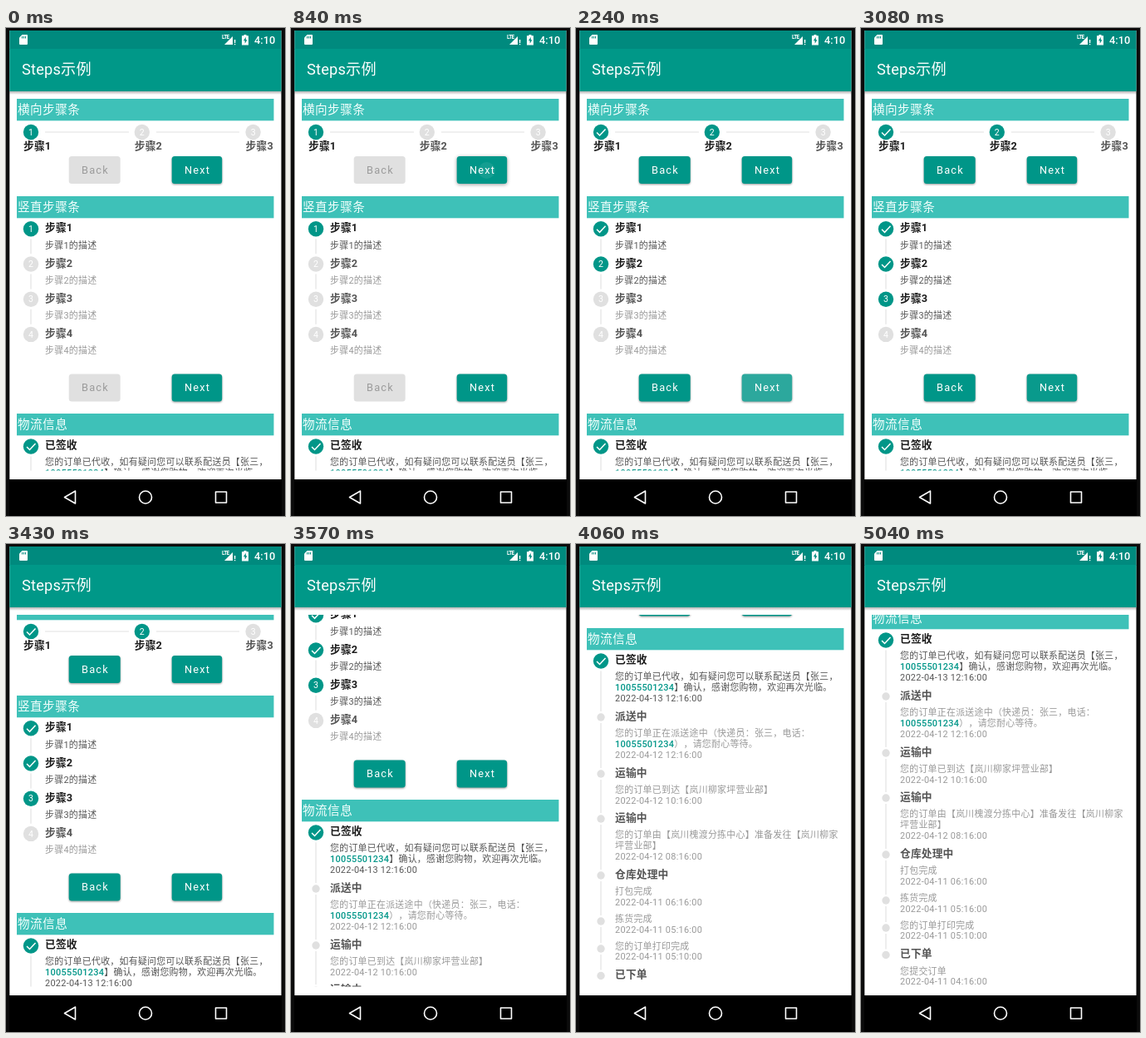
Animation of 336 by 586 pixels, one loop 5180 ms. Source, as an HTML page:

```html
<!DOCTYPE html>
<html lang="zh-CN">
<head>
<meta charset="utf-8">
<style>
html, body { margin: 0; width: 100%; height: 100%; overflow: hidden; background: #0b0b0b; }
svg { display: block; }
text { font-family: Roboto, 'Noto Sans CJK SC', 'Noto Sans CJK', sans-serif; white-space: pre; text-spacing-trim: space-all; }
.bar { font-size: 14.6px; letter-spacing: .46px; fill: #f4fffd; }
.title { font-size: 12.75px; font-weight: 700; letter-spacing: .15px; }
.desc { font-size: 10.93px; letter-spacing: .27px; }
.num { font-size: 10.5px; fill: #fff; text-anchor: middle; }
.btn { font-size: 12.75px; letter-spacing: 1.2px; }
</style>
</head>
<body>
<svg id="stage" width="336" height="586" viewBox="0 0 336 586">
  <defs>
    <clipPath id="view"><rect x="4" y="85" width="328" height="446.5"/></clipPath>
    <linearGradient id="shade" x2="0" y2="1"><stop stop-color="#000" stop-opacity=".3"/><stop offset="1" stop-opacity="0"/></linearGradient>
  </defs>
  <rect x="4.3" y="3" width="327.2" height="539" fill="#fff"/>
  <g clip-path="url(#view)"><g id="list"></g></g>
  <rect x="4.3" y="76" width="327.2" height="4" fill="url(#shade)"/>
  <rect x="4.3" y="3" width="327.2" height="23" fill="#008a7e"/>
  <rect x="4.3" y="25" width="327.2" height="51" fill="#009888"/>
  <text x="19" y="56" font-size="18.2" letter-spacing=".2" fill="#fff">Steps示例</text>
  <g fill="#fff">
    <path d="M19.500 8H25q1 0 1 1v10q0 1-1 1H17q-1 0-1-1V11.500z"/>
    <path d="M19.500 10v2.500M21.500 10v2.500M23.500 10v2.500" stroke="#008a7e"/>
    <text x="260" y="13" font-size="6.500" font-weight="700" letter-spacing="-.7">LTE</text>
    <path d="M263 20H273V10z"/>
    <path d="M275 14h1.300v4H275zM275 19h1.300v1.300H275z"/>
    <path d="M286.500 8h3v1.200H292V20.500H284V9.200h2.500z"/>
    <path d="M288.800 10.800l-2.800 4.500h1.700v3.400l2.700-4.500h-1.600z" fill="#008a7e"/>
    <text x="299" y="19" font-size="12.800" font-weight="500">4:10</text>
  </g>
  <rect x="4" y="542" width="328" height="44" fill="#000"/>
  <g fill="none" stroke="#fff" stroke-width="1.600" stroke-linejoin="round">
    <path d="M70.500 563.500L83.500 556V571z"/>
    <circle cx="168" cy="563.500" r="7.500"/>
    <rect x="252.500" y="557" width="13" height="13"/>
  </g>
</svg>
<script>
const LOOP = 5180, STEP = 70;
const TEAL = '#009688', GREY = '#e0e0e0', DARK = '#1c1c1c', MID = '#555', PALE = '#999';
const list = document.getElementById('list');
const PHONE = '10055501234', DEPOT = '岚川柳家坪营业部';

// dot centre, title, first line's centre, lines
const parcels = [
  [502.5, '已签收', 521, ['您的订单已代收，如有疑问您可以联系配送员【张三，', PHONE + '】确认，感谢您购物，欢迎再次光临。', '2022-04-13 12:16:00']],
  [570, '派送中', 589, ['您的订单正在派送途中（快递员：张三，电话：', PHONE + '），请您耐心等待。', '2022-04-12 12:16:00']],
  [638, '运输中', 657, ['您的订单已到达【' + DEPOT + '】', '2022-04-12 10:16:00']],
  [692, '运输中', 711, ['您的订单由【岚川槐渡分拣中心】准备发往【' + DEPOT.slice(0, 4), DEPOT.slice(4) + '】', '2022-04-12 08:16:00']],
  [760, '仓库处理中', 779, ['打包完成', '2022-04-11 06:16:00']],
  [815, '', 812, ['拣货完成', '2022-04-11 05:16:00']],
  [848, '', 844.5, ['您的订单打印完成', '2022-04-11 05:10:00']],
  [880.5, '已下单', 899.5, ['您提交订单', '2022-04-11 04:16:00']]
];

// time and scroll offset pairs
const scrollKeys = [[3360, 0], [3430, 20], [3570, 156], [3710, 283], [3850, 351], [3920, 357],
  [3990, 359], [4060, 362], [4130, 371], [4200, 381], [4270, 387]];

function scrollAt(t) {
  let [t0, y0] = scrollKeys[0];
  for (const [t1, y1] of scrollKeys) {
    if (t < t1) return t <= t0 ? y0 : Math.round(y0 + (y1 - y0) * (t - t0) / (t1 - t0));
    [t0, y0] = [t1, y1];
  }
  return y0;
}

const text = (cls, x, y, s, fill) => `<text class="${cls}" x="${x}" y="${y}"${fill ? ` fill="${fill}"` : ''}>${s}</text>`;
const disc = (x, y, r, fill) => `<circle cx="${x}" cy="${y}" r="${r}" fill="${fill}"/>`;
const line = (x0, y0, x1, y1) => `<path d="M${x0} ${y0}L${x1} ${y1}" stroke="#e2e2e2" stroke-width="1.2"/>`;
const bar = (y, s) => `<rect x="13" y="${y}" width="309.5" height="26.3" fill="#3ec1b8"/>` + text('bar', 14, y + 18, s);
const check = (x, y) => disc(x, y, 9.2, TEAL) +
  `<path d="M${x - 5} ${y + .5}l3.5 3.5l7-7.500" fill="none" stroke="#fff" stroke-width="1.5"/>`;

function badge(x, y, n, now) {
  return n < now ? check(x, y) : disc(x, y, 9.2, n === now ? TEAL : GREY) + text('num', x, y + 3.7, n);
}

function button(x, y, label, on, age = -1) {
  const w = label === 'Back' ? 62 : 60.5, h = 33;
  const held = age >= 0 && age < 210;
  const shadow = on ? `style="filter:drop-shadow(0 1px ${held ? 2 : 1}px rgba(0,0,0,.4))"` : '';
  let s = `<rect x="${x}" y="${y}" width="${w}" height="${h}" rx="3.5" fill="${on ? TEAL : GREY}" ${shadow}/>`;
  if (age >= 0 && age < 700) {
    const r = 10 + 42 * Math.min(1, age / 225);
    const alpha = .24 * Math.min(1, (age + 35) / 105, (700 - age) / 490);
    s += `<svg x="${x}" y="${y}" width="${w}" height="${h}"><circle cx="36" cy="17" r="${r}" fill="#fff" opacity="${alpha}"/></svg>`;
  }
  return s + text('btn', x + 15.3, y + 21, label, on ? '#fff' : '#9b9b9b');
}

function buttons(y, now, age) {
  return button(75.7, y, 'Back', now > 1) + button(199.7, y, 'Next', true, age);
}

function row(now, age) {
  let s = bar(85, '横向步骤条') + line(47, 125, 148, 125) + line(181, 125, 281, 125);
  for (let n = 1; n < 4; n++) {
    const x = 30 + (n - 1) * 133.8;
    s += badge(x, 125, n, now) + text('title', x - 9, 145.5, '步骤' + n, n <= now ? DARK : MID);
  }
  return s + buttons(154, now, age);
}

function column(now, age) {
  let s = bar(202, '竖直步骤条');
  for (let n = 1; n < 5; n++) {
    const y = 241.3 + (n - 1) * 42.2, on = n <= now;
    if (n < 4) s += line(30, y + 12, 30, y + 30);
    s += badge(30, y, n, now) + text('title', 47, y + 3, '步骤' + n, on ? DARK : MID) +
      text('desc', 47, y + 23.3, `步骤${n}的描述`, on ? MID : PALE);
  }
  return s + buttons(415.4, now, age);
}

function tracking() {
  return bar(463, '物流信息') + parcels.map(([y, title, top, lines], i) => {
    const next = parcels[i + 1];
    return (next ? line(30, y + (i ? 7 : 12), 30, next[0] - 7) : '') +
      (i ? disc(30, y, 4.7, GREY) : check(30, y)) +
      text('title', 47, y + 2.7, title, i ? MID : DARK) +
      lines.map((s, k) => text('desc', 47, top + 4 + k * 12.9,
        s.replace(PHONE, `<tspan fill="${TEAL}" font-weight="500">${PHONE}</tspan>`), i ? PALE : MID)).join('');
  }).join('');
}

const parcelView = tracking();
let shown = -1;

function draw(t) {
  const across = 1 + (t >= 980);
  const down = 1 + (t >= 2030) + (t >= 2590);
  list.innerHTML = row(across, t - 840) + column(down, t - (t < 2450 ? 1890 : 2450)) + parcelView;
  list.setAttribute('transform', `translate(0 ${-scrollAt(t)})`);
}

const start = performance.now();
function tick() {
  const t = Math.floor((performance.now() - start) % LOOP / STEP) * STEP;
  if (t !== shown) draw(shown = t);
  requestAnimationFrame(tick);
}
tick();
</script>
</body>
</html>
```
